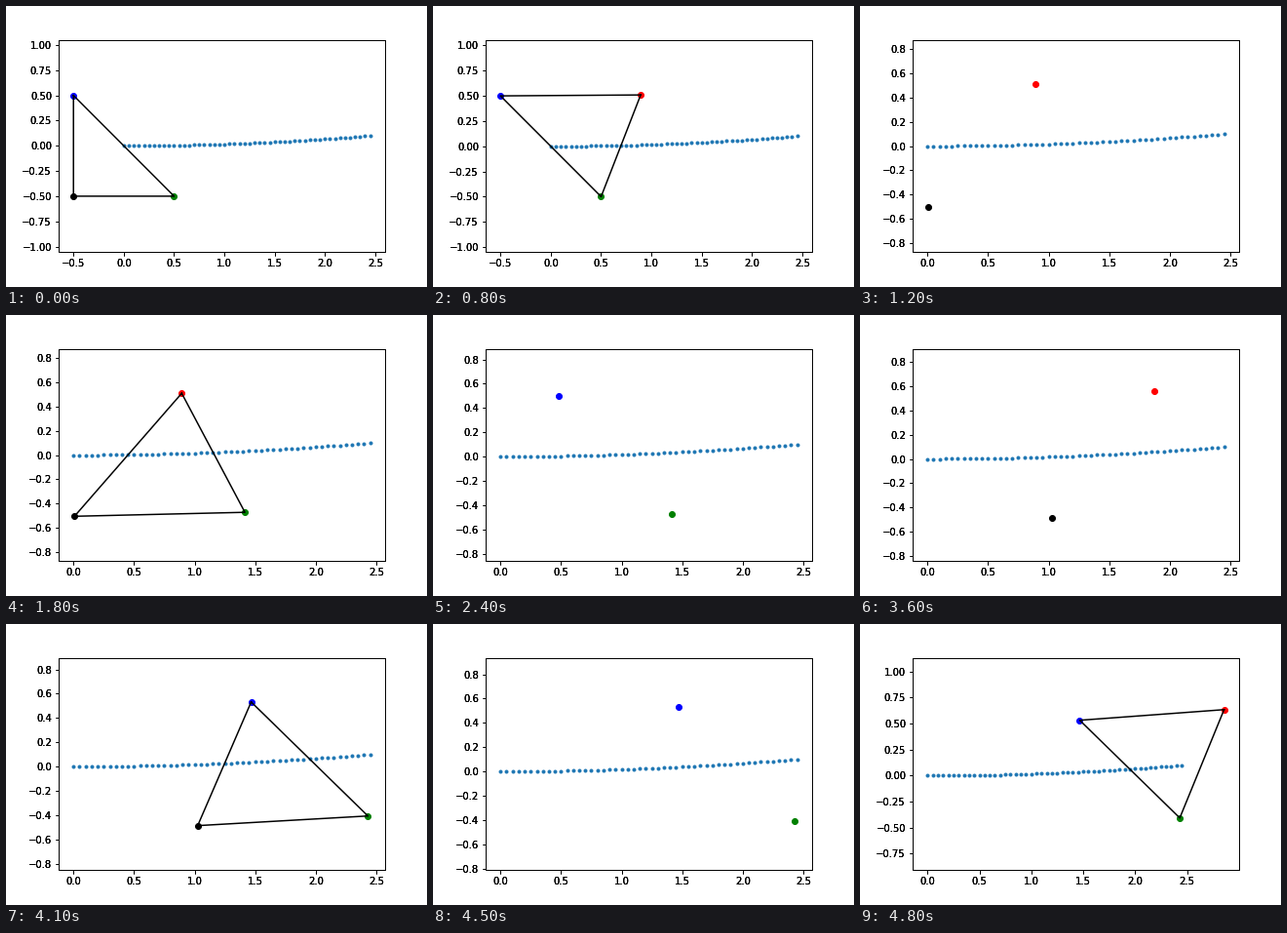
A matplotlib script that plays this animation: 432 px wide and 288 px high, repeating every 5000 ms.

```python
import numpy as np
import matplotlib.pyplot as plt
from matplotlib.animation import FuncAnimation

FRAMES, INTERVAL = 50, 100
STEP = 0.05          # distance walked per frame
RADIUS = 30          # radius of the curved walk
CYCLE, STANCE = 20, 12

# colour, hip offset (forward, left), frame of the cycle at which the foot lands
LEGS = [("r", 0.5, 0.5, 8), ("b", -0.5, 0.5, 0),
        ("k", -0.5, -0.5, 10), ("g", 0.5, -0.5, 18)]

LEFT, BOTTOM, RIGHT, TOP = 0.125, 0.125, 0.9, 0.88

plt.rcParams.update({"font.family": "DejaVu Sans", "font.size": 10})


def body(n):
    """Body position and heading after n steps."""
    turn = n * STEP / RADIUS
    return RADIUS * np.sin(turn), RADIUS * (1 - np.cos(turn)), turn


def foothold(n, fwd, side):
    """Point below a hip when the body is at step n."""
    x, y, turn = body(n)
    c, s = np.cos(turn), np.sin(turn)
    return x + fwd * c - side * s, y + fwd * s + side * c


def planted(n):
    """Footholds of the legs on the ground, None for a lifted leg."""
    feet = []
    for _, fwd, side, land in LEGS:
        age = (n - land) % CYCLE
        feet.append(foothold(max(n - age, 0), fwd, side)
                    if age < STANCE else None)
    return feet


fig = plt.figure(figsize=(6, 4), dpi=72, facecolor="white")
box = [LEFT, BOTTOM, RIGHT - LEFT, TOP - BOTTOM]
ratio = (box[3] * 4) / (box[2] * 6)

# Stacked copies of the axes give crisp, dark tick labels
layers = [fig.add_axes(box, label=f"layer{k}") for k in range(3)]
for layer in layers[1:]:
    layer.patch.set_visible(False)
ax = layers[0]

path_x, path_y, _ = body(np.arange(FRAMES))
ax.plot(path_x, path_y, ".", color="C0")
dots = [ax.plot([], [], leg[0] + "o")[0] for leg in LEGS]
support, = ax.plot([], [], "k-")


def fit_view(xs, ys):
    """Equal scaling: x fits the data, y is centred on it."""
    pad = 0.05 * (max(xs) - min(xs))
    x0, x1 = min(xs) - pad, max(xs) + pad
    mid = (min(ys) + max(ys)) / 2
    half = (x1 - x0) * ratio / 2
    for layer in layers:
        layer.set_xlim(x0, x1)
        layer.set_ylim(mid - half, mid + half)


def draw(n):
    feet = planted(n)
    for dot, foot in zip(dots, feet):
        dot.set_data(*([[foot[0]], [foot[1]]] if foot else [[], []]))
    down = [foot for foot in feet if foot]
    ring = down + down[:1] if len(down) > 2 else []
    support.set_data([p[0] for p in ring], [p[1] for p in ring])
    fit_view([*path_x, *(p[0] for p in down)],
             [*path_y, *(p[1] for p in down)])
    return [*dots, support]


anim = FuncAnimation(fig, draw, frames=FRAMES, interval=INTERVAL,
                     init_func=lambda: draw(0), repeat=True)
plt.show()
```
